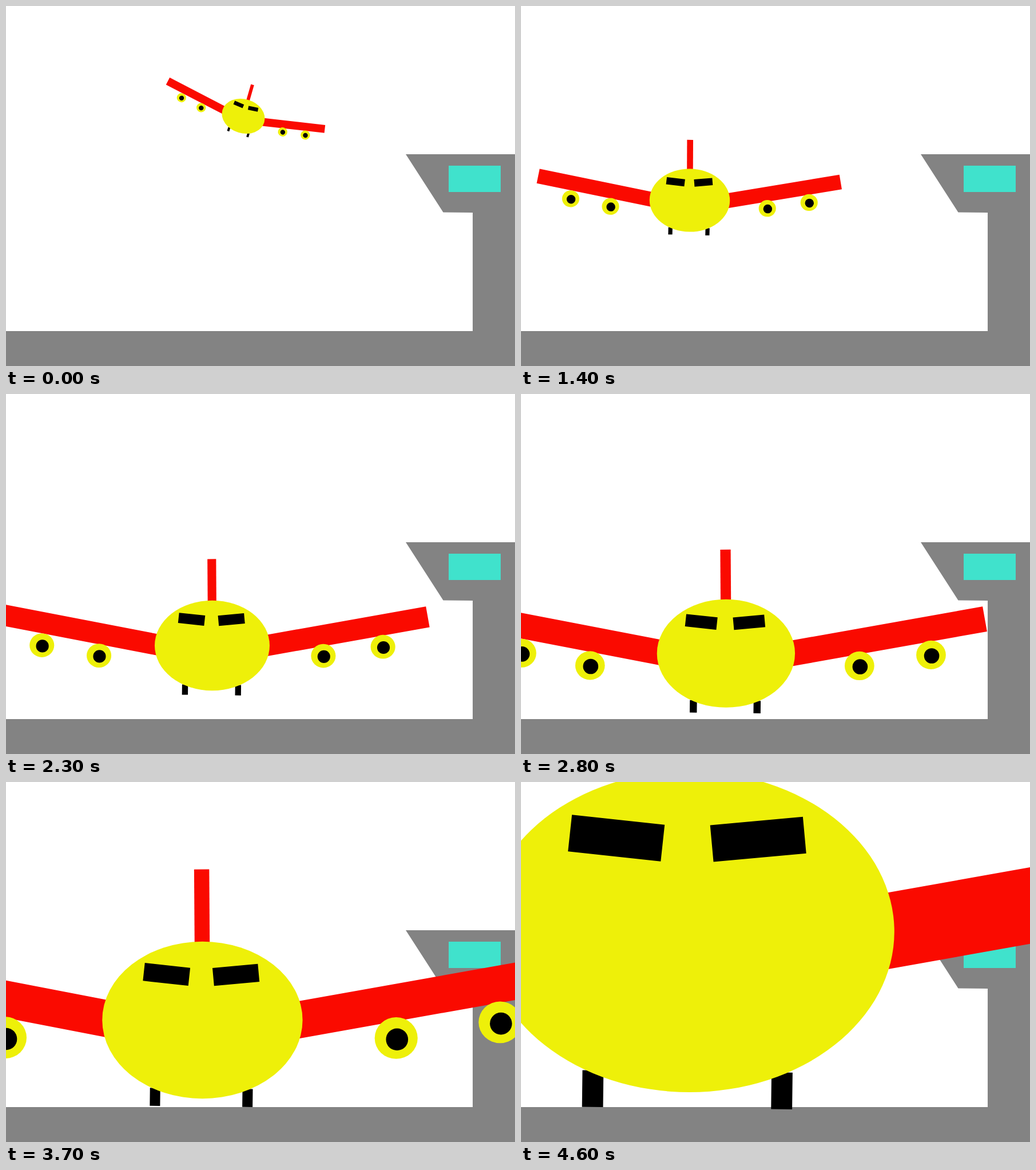
An HTML page for the animation above (4.7 s loop, 890 px wide and 629 px high).

```html
<!DOCTYPE html>
<html lang="en">
<head>
<meta charset="utf-8">
<title>Landing plane</title>
<style>
  html, body { margin: 0; width: 100%; height: 100%; overflow: hidden; background: #fff; }
  svg { display: block; width: 890px; height: 629px; }
  .grey { fill: #838383; }
  .glass { fill: #40e2cc; }
  .yellow { fill: #eef009; }
  .wings { stroke: #fa0a00; stroke-width: 84; }
  .tail { stroke: #fa0a00; stroke-width: 34.5; }
  .legs { stroke: #000; stroke-width: 23.5; }
  .windows { stroke: #000; stroke-width: 41; }
</style>
</head>
<body>
<svg viewBox="0 0 890 629">
  <path class="grey" d="M699 259H890V629H0V568H816V361L764.5 360.5Z"/>
  <rect class="glass" x="774" y="279" width="91" height="46"/>
  <g id="plane">
    <path class="tail" d="M-1.7-343.5L-.5-165"/>
    <path class="wings" d="M-863.5-127.5L-180 4M857-114L180 6.4"/>
    <path class="legs" d="M-107.8 154.5L-108.3 195.5M103.2 157L102.7 198"/>
    <ellipse class="yellow" rx="228.5" ry="179"/>
    <path class="windows" d="M-133.5-110L-30-98.8M24.8-98.3L128.3-107.8"/>
  </g>
</svg>
<script>
const LOOP = 4700, STEP = 100, BODY = 457, LEVEL = 800;
const plane = document.getElementById('plane');

const engine = (x, y) =>
  `<ellipse class="yellow" cx="${x}" cy="${y}" rx="49" ry="47.5"/>` +
  `<circle cx="${x + 2}" cy="${y + 3}" r="25.2"/>`;
plane.innerHTML += engine(-677, -1) + engine(-450, 40) + engine(442, 41) + engine(679, 5);

// On the runway the plane grows away from one vanishing point.
const rolling = (t, w) => ({ t, w, x: 390 - 0.133 * w, y: 564 - 0.4224 * w });
const flying = (t, w, x, y) => ({ t, w, x, y });

const path = [
  flying(0, 76.2, 415, 192.5),
  flying(LEVEL, 107, 320.5, 237.5),
  flying(1200, 132.4, 276, 306),
  flying(1400, 140.5, 295, 339.5),
  flying(1800, 160, 340, 382),
  flying(2300, 201, 360.5, 439.5),
  flying(2400, 209, 363.5, 453),
  rolling(3000, 261.6),
  rolling(3300, 293.5),
  rolling(3600, 331),
  rolling(4100, 457),
  rolling(4600, 716)
];

const mix = (a, b, f) => a + (b - a) * f;

// Banked at first, then level with one slight sway.
const tilt = t => t < LEVEL
  ? 16.5 * (1 - t / LEVEL)
  : 0.7 * Math.sin(Math.PI * Math.min(1, (t - LEVEL) / 1500));

function pose(t) {
  const i = Math.max(1, path.findIndex(k => k.t >= t));
  const a = path[i - 1], b = path[i];
  // Distance, the inverse of width, shrinks evenly.
  const w = 1 / mix(1 / a.w, 1 / b.w, (t - a.t) / (b.t - a.t));
  const f = (w - a.w) / (b.w - a.w);
  return { w, x: mix(a.x, b.x, f), y: mix(a.y, b.y, f) };
}

function draw() {
  const t = Math.floor(performance.now() % LOOP / STEP) * STEP;
  const { w, x, y } = pose(t);
  plane.setAttribute('transform',
    `translate(${x} ${y}) rotate(${tilt(t)}) scale(${w / BODY})`);
  requestAnimationFrame(draw);
}
draw();
</script>
</body>
</html>
```
